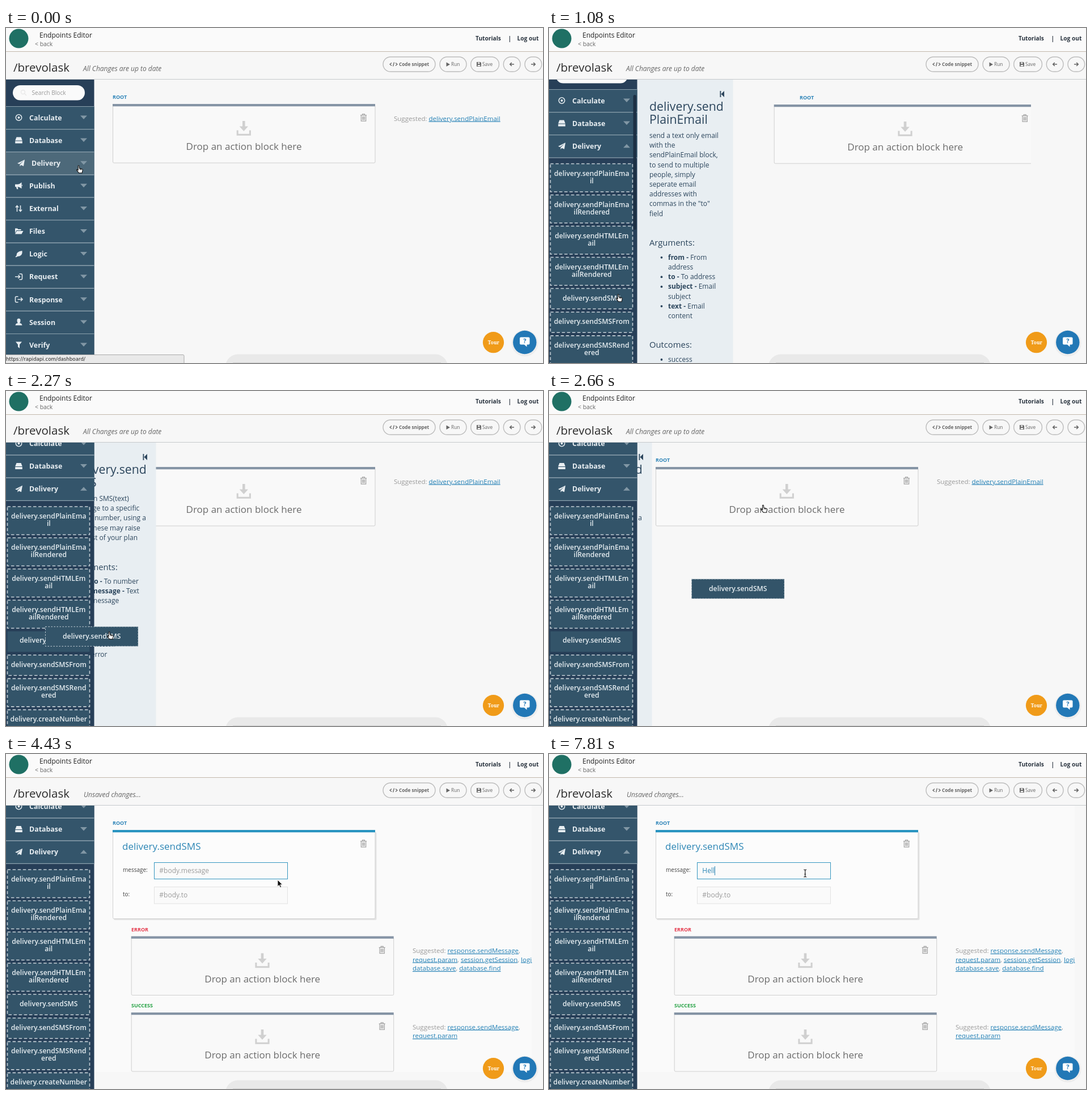
These frames come from a looping animation (947 by 591 pixels, 8000 ms). An HTML page:

```html
<!DOCTYPE html>
<html lang="en">
<head>
<meta charset="utf-8">
<title>Endpoints Editor</title>
<style>
html, body { margin: 0; width: 100%; height: 100%; overflow: hidden; background: #f7f7f7; }
svg { display: block; width: 947px; height: 591px; font: 12px "Open Sans", "Noto Sans", sans-serif; }
text { white-space: pre; }
.b { font-weight: 700; }
.mid { text-anchor: middle; }
.line { fill: none; stroke: currentColor; }
.btn rect { fill: none; stroke: #bdbdbd; stroke-width: 1.4; }
.btn { font-size: 8.4px; fill: #666; color: #666; }
.sug { font-size: 11.5px; fill: #999; }
.sug tspan { fill: #2380b5; text-decoration: underline; }
.label { font-size: 9px; font-weight: 700; }
.row { font-size: 12.4px; font-weight: 700; fill: #e8eef2; color: #dfe7ec; }
.item { font-size: 12.2px; font-weight: 600; fill: #e6edf1; text-anchor: middle; }
.item rect { fill: #335469; stroke: #c3ced5; stroke-width: 1.6; stroke-dasharray: 5.5 3.6; }
.item.hot { font-size: 12.5px; font-weight: 700; fill: #fff; }
.item.hot rect { fill: #4f6878; }
.item.bare rect { stroke: none; }
.item.bare text { transform: translateY(-1.5px); }
.panel { fill: #2c465d; }
.panel .title { font-size: 21.3px; }
.panel .sub { font-size: 14.8px; }
.field { fill: #fafafa; stroke: #e2e2e2; }
</style>
</head>
<body>
<svg viewBox="0 0 947 591" xmlns="http://www.w3.org/2000/svg">
<defs>
  <clipPath id="narrow"><path d="M156 91H850V591H156z"/></clipPath>
  <clipPath id="wide"><path d="M156 91H927.5V591H156z"/></clipPath>
  <g id="trash" class="line" color="#a3a3a3" stroke-width="1.2">
    <path d="M625 153.8h11M628.5 153.5v-1.7h4v1.7M626.3 154v10.2h8.4V154M628.6 156v6.2M630.5 156v6.2M632.4 156v6.2"/>
  </g>
  <g id="drop">
    <rect x="188.5" y="136.5" width="462.5" height="101.5" rx="2" fill="#f9f9f9" stroke="#cfcfcf"/>
    <rect x="188" y="134" width="463" height="4.2" fill="#8594a5"/>
    <use href="#trash"/>
    <path d="M417 164h4.600v9.500h5.400l-7.700 8.500-7.700-8.500h5.400z" fill="#d0d0d0"/>
    <path d="M408.200 180.500v7.800h22.200v-7.800" class="line" color="#d0d0d0" stroke-width="3"/>
    <text class="mid" x="419.500" y="215" font-size="17" fill="#6c6c6c">Drop an action block here</text>
  </g>
  <g id="hand" fill="#fff" stroke="#111" stroke-width="1.100" stroke-linejoin="round">
    <path d="M3 1.200c1-.9 1.900-.3 2 .8l.3 3.500 4.500 1.200c1.200.4 1.500 1.200 1.300 2.300l-.8 3.500v1.300H4.600L1 9.200C0 7.700 1 7.200 2 8l1.300 1z"/>
    <path d="M6.500 6v2.300M8.400 6.500v2" fill="none"/>
  </g>
  <path id="arrow" d="M0 0v11.800l2.700-2.500 1.900 4.300 2-.9-1.900-4.100h3.700z" fill="#111" stroke="#fff" stroke-width=".8"/>
  <path id="beam" d="M-2.500-6.500q2.500 0 2.500 1.500V5q0 1.500-2.500 1.500M2.500-6.500Q0-6.500 0-5V5q0 1.500 2.500 1.500M-1.500 1.500h3" fill="none" stroke="#222" stroke-width="1.200"/>
</defs>

<rect width="947" height="591" fill="#f7f7f7"/>
<rect x="156" y="91" width="771" height="470" fill="#fafafa" data-on="4430-8000"/>

<!-- canvas -->
<g data-on="0-930,2270-4430">
  <text class="label" x="188" y="125" fill="#2d84b8">ROOT</text>
  <use href="#drop"/>
  <text class="sug" x="684" y="163.500">Suggested: <tspan>delivery.sendPlainEmail</tspan></text>
</g>
<g data-on="930-2270" clip-path="url(#narrow)">
  <text class="label" x="442" y="126" fill="#2d84b8">ROOT</text>
  <use href="#drop" x="208.700" y="1"/>
</g>
<g data-on="4430-8000" clip-path="url(#wide)">
  <text class="label" x="188" y="125" fill="#2d84b8">ROOT</text>
  <rect x="190" y="138" width="463.500" height="155" rx="2" fill="#e3e3e3"/>
  <rect x="188.500" y="136.500" width="462.500" height="154" rx="2" fill="#fcfcfc" stroke="#d2d2d2"/>
  <rect x="188" y="134" width="463" height="4.200" fill="#2893c0"/>
  <use href="#trash"/>
  <text x="205" y="169" font-size="17" fill="#2c86b5">delivery.sendSMS</text>
  <g font-size="10" fill="#444"><text x="206" y="208">message:</text><text x="206" y="251">to:</text></g>
  <rect class="field" x="261.500" y="191.500" width="235" height="29" style="stroke:#3596c0"/>
  <rect class="field" x="261.500" y="234.500" width="235" height="29.500"/>
  <text x="270.300" y="209.500" fill="#9c9c9c" data-on="4430-7420">#body.message</text>
  <text x="270.300" y="253" fill="#9c9c9c">#body.to</text>
  <text id="typed" x="270.300" y="209.500" fill="#2c86b5"></text>
  <rect id="caret" x="270" y="198" width="1" height="16" fill="#2c86b5" data-on="5320-5560,6190-6550,7060-8000"/>

  <text class="label" x="221" y="312.500" fill="#e5394c">ERROR</text>
  <use href="#drop" x="32.700" y="187.500"/>
  <g class="sug">
    <text x="717" y="351">Suggested: <tspan>response.sendMessage</tspan>,</text>
    <text x="717" y="366.500"><tspan>request.param</tspan>, <tspan>session.getSession</tspan>, <tspan>logic.if</tspan></text>
    <text x="717" y="382"><tspan>database.save</tspan>, <tspan>database.find</tspan></text>
  </g>
  <text class="label" x="221" y="447" fill="#25a244">SUCCESS</text>
  <use href="#drop" x="32.700" y="322"/>
  <g class="sug">
    <text x="717" y="485.500">Suggested: <tspan>response.sendMessage</tspan>,</text>
    <text x="717" y="501"><tspan>request.param</tspan></text>
  </g>
</g>

<rect x="387" y="575.500" width="392" height="50" rx="22" fill="#e9e9e9"/>
<path d="M400 590.500h367" stroke="#d2d2d2"/>

<g id="panel" class="panel" data-on="930-3440">
  <rect x="100" y="91" width="224.500" height="500" fill="#e8eef2"/>
  <path d="M301.500 111h1.800v11h-1.800zM309 111v11l-5.500-5.500z"/>
</g>

<!-- sidebar -->
<rect y="91" width="155.500" height="500" fill="#273f58"/>
<g id="side">
  <rect x="12" y="101" width="127" height="26.500" rx="13.200" fill="#fafafa"/>
  <path d="M33 116l3 3M33.500 113a3.500 3.500 0 1 1-7 0a3.500 3.500 0 1 1 7 0" class="line" color="#e8e8e8" stroke-width="1.300"/>
  <text x="45.500" y="118" font-size="10.200" fill="#999">Search Block</text>
</g>
<rect x="148.500" y="118" width="5.500" height="238" rx="2.700" fill="#1d3044" data-on="1080-2270"/>

<!-- header and toolbar -->
<rect width="947" height="91" fill="#f7f7f7"/>
<rect width="947" height="41" fill="#fafafa"/>
<path d="M0 41.500h947" stroke="#c3b9ab"/>
<path d="M0 90.500h947" stroke="#c6c9cc"/>
<circle cx="22.500" cy="18.500" r="17" fill="#1f7064"/>
<text x="59" y="17" fill="#222">Endpoints Editor</text>
<text x="51" y="32" font-size="10.400" fill="#666">&lt; back</text>
<g class="b" font-size="10.200" fill="#2b3540">
  <text x="828" y="22">Tutorials</text><text x="885.500" y="22">|</text><text x="901.500" y="22">Log out</text>
</g>
<text x="13" y="76.500" font-size="20.500" fill="#2b2b2b">/brevolask</text>
<g font-style="italic" fill="#666">
  <text x="136" y="76" data-on="0-4430,5560-7420">All Changes are up to date</text>
  <text x="137" y="76" data-on="4430-5320,7420-8000">Unsaved changes...</text>
  <text x="137" y="76" data-on="5320-5560">Saving...</text>
</g>
<g class="btn">
  <rect x="665" y="51" width="92" height="26" rx="13"/>
  <rect x="765" y="51" width="47" height="26" rx="13"/>
  <rect x="819.700" y="51" width="49.800" height="26" rx="13"/>
  <rect x="877.300" y="51" width="29.700" height="26" rx="13"/>
  <rect x="915" y="51" width="29.700" height="26" rx="13"/>
  <path class="line" d="M680 61.500l-3 2.500 3 2.500M687 61.500l3 2.500-3 2.500M684.500 60.500l-2 7" stroke-width="1.300"/>
  <text class="b" x="693" y="67" font-size="8.200">Code snippet</text>
  <path d="M776.500 60.500l6.500 3.700-6.500 3.700z"/><text x="785" y="67">Run</text>
  <path d="M830 60h6.500l1.500 1.500V68h-8zM832 60.800h3.500V63H832zM831.700 65v2.300h4.600V65z" fill-rule="evenodd"/><text x="840" y="67">Save</text>
  <path class="line" d="M896 64h-7M891.800 61l-3 3 3 3M926 64h7M930.200 61l3 3-3 3" stroke-width="1.700"/>
</g>

<circle cx="859.500" cy="554.700" r="18.600" fill="#f09b19"/>
<text class="mid" x="859.800" y="558" fill="#fff" style="font:900 8.400px 'Noto Serif',serif">Tour</text>
<circle cx="915" cy="556" r="23.500" fill="#ededed"/>
<circle cx="914.800" cy="554.500" r="20.700" fill="#2278b6"/>
<path d="M908 545.500h13.500q2 0 2 2v9q0 2-2 2h-3v4l-4.500-4h-6q-2 0-2-2v-9q0-2 2-2z" fill="#fff"/>
<text class="mid b" x="914.800" y="556" font-size="11" fill="#2278b6">?</text>

<g data-on="0-1080">
  <path d="M-1 576.500H312q2 0 2 2V592H-1z" fill="#e9e9e9" stroke="#a9a9a9"/>
  <text x="0" y="587" fill="#222" style="font:8.700px 'DejaVu Sans',sans-serif">https://rapidapi.com/dashboard/</text>
</g>

<g id="ghost" data-on="2270-3440">
  <rect x="251.500" y="331.800" width="163.500" height="34.500" fill="#335469" stroke="#c3ced5" stroke-dasharray="2.500 2.500"/>
  <text class="mid" x="333.300" y="353" font-size="12.200" font-weight="600" fill="#e6edf1">delivery.sendSMS</text>
</g>
<use id="cursor"/>
</svg>

<script>
const LOOP = 8000;
const $ = id => document.getElementById(id);
const add = (id, html) => $(id).insertAdjacentHTML('beforeend', html);
const on = spans => spans ? ` data-on="${spans}"` : '';

// Sidebar: each row is a name and its icon, drawn around 0,0
const stroke = (d, w = 1.6) => `<path class="line" stroke-width="${w}" d="${d}"/>`;
const solid = d => `<path d="${d}"/>`;
const rows = [
  ['Calculate', '<circle class="line" r="5.2" stroke-width="1.6"/><circle r="2"/>'],
  ['Database', solid('M-4-5.500h8l2.300 6h-12.600zM-6.300 1.500H6.300V5.500H-6.300z')],
  ['Delivery', solid('M6.500-6L4.500 5.500 0 3.500-2 6v-3.500L4.500-4-3 1.800-6.500.5z')],
  ['Publish', solid('M5-6V5Q1 2-2 2l1 4h-2.500l-1-4H-6.500v-4.500H-2Q1-2.500 5-6zM5.500-2q2 1.500 0 3z')],
  ['External', stroke('M-3 5.500V-4M-5.500-2l2.500-3 2.500 3M3-5.500V4M.5 2L3 5l2.500-3')],
  ['Files', solid('M-6.500 3.500V-5h4l1.500 1.500h5v2h-8zM-6.500 5l3-5.500H8L5 5z')],
  ['Logic', solid('M6-5.500Q7.500 4-2 4.500l-3 1.500-1-1 2-2Q-5-4 6-5.500z')],
  ['Request', stroke('M1-5h3q2 0 2 2v6q0 2-2 2H1M-6.500 0h8M-1-3l3 3-3 3')],
  ['Response', stroke('M-1-5h-3q-2 0-2 2v6q0 2 2 2h3M-2 0h8M3.500-3l3 3-3 3')],
  ['Session', solid('M-3-3a3 3.300 0 1 1 6 0Q3 0 1.500 1.500 5.500 2 6 5.500H-6Q-5.500 2-1.500 1.500-3 0-3-3z')],
  ['Verify', solid('M-5.500-5.500h11L1.500-.5V6l-3-2.500v-4z')]
];
const STEP = 40.1, TOP = 138.5;

function row(i, { open = false, hot = false, spans = '' } = {}) {
  const [name, icon] = rows[i], dx = hot ? 4 : 0, y = TOP + i * STEP;
  const tri = open ? 'M131 22.500h12l-6-6.500z' : 'M131 16h12l-6 6.500z';
  return `<g class="row" transform="translate(0 ${y})"${on(spans)}>
    <rect width="155.500" height="${STEP}" fill="${hot ? '#4d697a' : '#34556b'}"/>
    <path d="M0 0h155.500M0 ${STEP}h155.500" stroke="#8ba0ad" stroke-width="1.2"/>
    <g transform="translate(${22.5 + dx} 19.500)">${icon}</g>
    <text x="${41 + dx}" y="24.300">${name}</text>
    <path d="${tri}" fill="#8197a5"/></g>`;
}

add('side', row(0) + row(1) +
  rows.slice(3).map((r, i) => row(i + 3, { spans: '0-930' })).join('') +
  row(2, { hot: true, spans: '0-930' }) + row(2, { open: true, spans: '930-8000' }));

// Action blocks inside the open section
const actions = ['PlainEma|il', 'PlainEma|ilRendered', 'HTMLEm|ail', 'HTMLEm|ailRendered',
  'SMS', 'SMSFrom', 'SMSRend|ered', 'createNumber'];
const states = {
  0: { hot: '930-1080', '': '1080-8000' },
  4: { hot: '1920-2270', bare: '2270-3440', '': '930-1920,3440-8000' }
};

function action(label, y, kind, spans) {
  const hot = kind === 'hot', lines = label.split('|'), h = lines.length > 1 ? 49.5 : 36;
  const text = lines.map((s, i) => `<text x="75.300" y="${21 + i * 13}">${s}</text>`).join('');
  return `<g class="item ${kind}" transform="translate(0 ${y})"${on(spans)}>
    <rect x="${hot ? 0 : 2.5}" y="${hot ? -2 : 0}" width="${hot ? 152 : 145}" height="${h + (hot ? 3 : 0)}"/>${text}</g>`;
}

let y = 269.5, list = '';
actions.forEach((name, i) => {
  const label = 'delivery.' + (name.startsWith('create') ? '' : 'send') + name;
  const kinds = states[i] || { '': '930-8000' };
  for (const kind in kinds) list += action(label, y, kind, kinds[kind]);
  y += name.includes('|') ? 55 : 41.7;
});
add('side', list);

// Help panel: running baseline moves down the column
function help(spans, title, body, args) {
  let y = 194, out = '';
  const put = (x, s, cls = '') => out += `<text class="${cls}" x="${x}" y="${y}">${s}</text>`;
  const entry = lines => lines.split('|').forEach((s, i) => {
    if (!i) out += `<circle cx="198.500" cy="${y - 4}" r="1.900"/>`;
    put(210, s.replace(/^(\w+ -)/, '<tspan class="b">$1</tspan>'));
    y += 17.2;
  });
  title.split('|').forEach((s, i) => out += `<text class="title" x="177" y="${146 + i * 23}">${s}</text>`);
  body.split('|').forEach(s => { put(177, s); y += 17.2; });
  y += 35.5;
  put(177, 'Arguments:', 'sub');
  y += 24.5;
  args.forEach(entry);
  y += 34.8;
  put(177, 'Outcomes:', 'sub');
  y += 25;
  ['success', 'error'].forEach(entry);
  add('panel', `<g${on(spans)}>${out}</g>`);
}
help('930-1920', 'delivery.send|PlainEmail',
  'send a text only email|with the|sendPlainEmail block,|to send to multiple|people, simply|seperate email|addresses with|commas in the "to"|field',
  ['from - From|address', 'to - To address', 'subject - Email|subject', 'text - Email|content']);
help('1920-3440', 'delivery.send|SMS',
  'send an SMS(text)|message to a specific|phone number, using a|lot of these may raise|the cost of your plan',
  ['to - To number', 'message - Text|message']);

// Stepped tracks: [start, ...values]
const scroll = [[0, 0], [930, 1], [1080, 30], [1920, 65.5]];
const slide = [[0, -34], [1080, 0], [2270, -60], [2660, -143]];
const drag = [[0, -182, 84], [2660, 0, 0]];
const typing = [[0, ''], [7420, 'H'], [7570, 'He'], [7810, 'Hell']];
const pointer = [
  [0, 'hand', 124, 242], [150, 'hand', 123.5, 244.5], [930, 'hand', 120, 473.5], [1080, 'hand', 118, 469],
  [1920, 'hand', 102, 447], [2270, 'hand', 178, 424], [2660, 'hand', 373.5, 200.5], [3440, 'hand', 378.5, 191],
  [3800, 'hand', 481, 222], [4280, 'arrow', 479, 222], [4640, 'beam', 490, 217], [5320, 'beam', 451.7, 210.5]
];
const at = (track, t) => track.filter(k => k[0] <= t).pop().slice(1);
const move = (id, x, y) => $(id).setAttribute('transform', `translate(${x} ${y})`);

const timed = [...document.querySelectorAll('[data-on]')].map(el =>
  ({ el, spans: el.dataset.on.split(',').map(s => s.split('-').map(Number)) }));

function render(t) {
  for (const { el, spans } of timed)
    el.style.display = spans.some(([a, b]) => t >= a && t < b) ? '' : 'none';
  move('side', 0, -at(scroll, t)[0]);
  move('panel', at(slide, t)[0], 0);
  move('ghost', ...at(drag, t));
  const [kind, x, y] = at(pointer, t);
  $('cursor').setAttribute('href', '#' + kind);
  move('cursor', x, y);
  const word = at(typing, t)[0], typed = $('typed');
  if (typed.textContent !== word) typed.textContent = word;
  $('caret').setAttribute('x', 270 + (word ? Math.round(typed.getComputedTextLength()) : 0));
}

const start = performance.now();
function tick() {
  render((performance.now() - start) % LOOP);
  requestAnimationFrame(tick);
}
tick();
</script>
</body>
</html>
```
